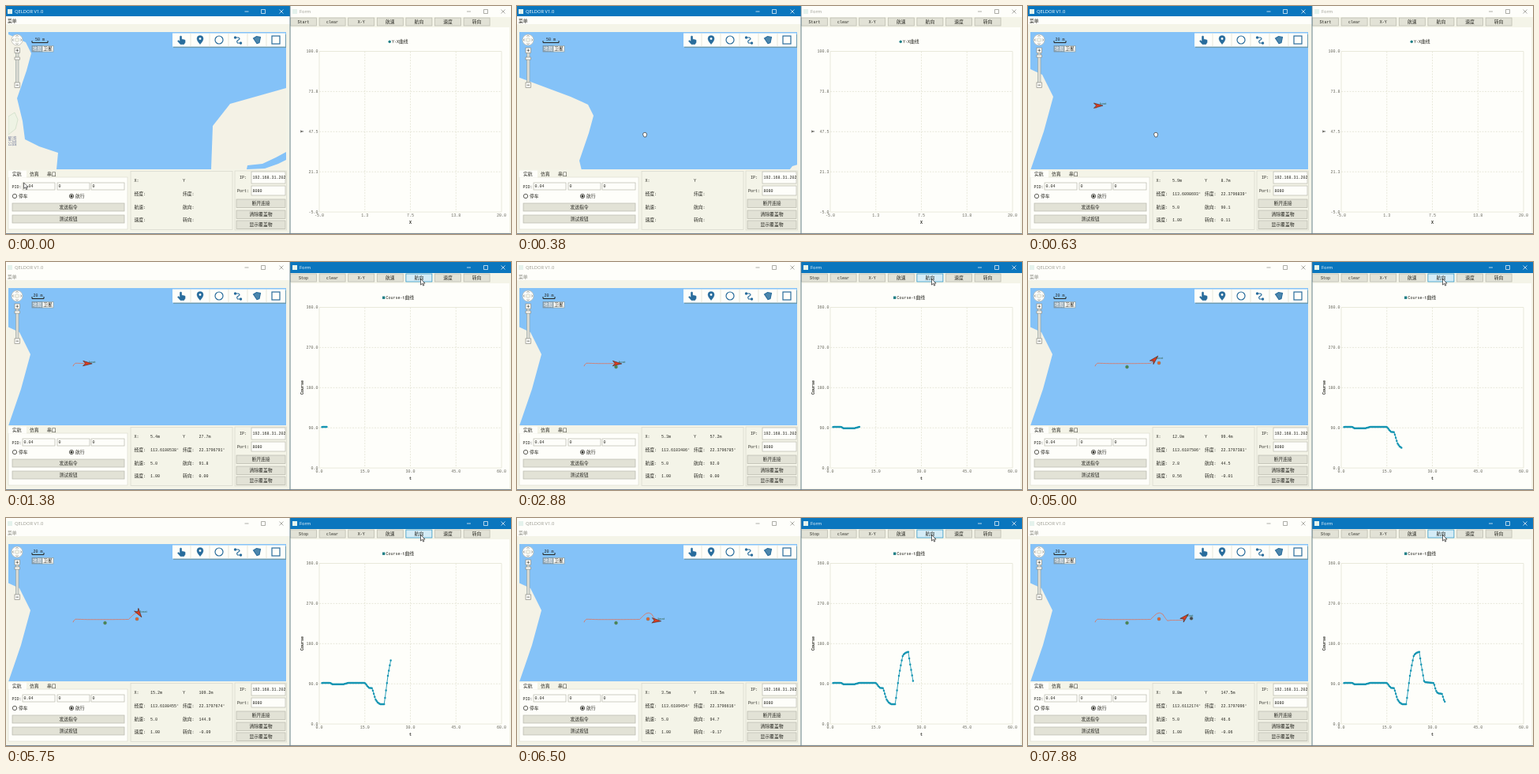
An HTML page for the animation above (8000 ms loop, 640 by 289 pixels).

```html
<!DOCTYPE html>
<html lang="zh">
<head>
<meta charset="utf-8">
<title>Boat control</title>
<style>
html, body { margin: 0; width: 100%; height: 100%; overflow: hidden; }
svg { display: block; width: 100vw; height: 100vh; }
text { font-family: "Liberation Mono", "Noto Sans CJK SC", "Noto Sans CJK", monospace; white-space: pre; }
text.ui { font-family: "Open Sans", sans-serif; }
</style>
</head>
<body>
<svg id="stage" viewBox="0 0 640 289"></svg>
<script>
const stage = document.getElementById('stage');
const PANEL = '#f4f4e8', PAPER = '#fefefa', BUTTON = '#e2e2d6', EDGE = '#b8b8ac';
const INK = '#25251f', BLUE = '#0a76be', WATER = '#84c2f8', LAND = '#f4f2e6', ICON = '#286c9c';
const GRID = '#e4e4d4', DATA = '#1595b2';

function add(parent, tag, attrs = {}) {
  const node = document.createElementNS('http://www.w3.org/2000/svg', tag);
  set(node, attrs);
  parent.append(node);
  return node;
}
function set(node, attrs) {
  for (const key in attrs) node.setAttribute(key, attrs[key]);
}
const show = (node, on) => set(node, { display: on ? 'inline' : 'none' });
const rect = (p, x, y, width, height, fill, stroke = 'none', w = 0.7) =>
  add(p, 'rect', { x, y, width, height, fill, stroke, 'stroke-width': w });
const line = (p, d, stroke, w = 1, fill = 'none') =>
  add(p, 'path', { d, stroke, fill, 'stroke-width': w });
const dot = (p, cx, cy, r, fill, stroke = 'none', w = 0.7) =>
  add(p, 'circle', { cx, cy, r, fill, stroke, 'stroke-width': w });

// Chinese runs are set slightly larger than the Latin ones.
function fillText(node, content) {
  if (node.dataset.value === content) return;
  node.dataset.value = content;
  node.textContent = '';
  for (const run of content.match(/[\u4e00-\u9fff]+|[^\u4e00-\u9fff]+/g) || []) {
    const span = add(node, 'tspan', { 'font-size': /[\u4e00-\u9fff]/.test(run) ? 5.8 : 5 });
    span.textContent = run;
  }
}
function text(p, x, y, content = '', anchor = 'start', fill = INK) {
  const node = add(p, 'text', { x, y, fill, 'text-anchor': anchor });
  fillText(node, content);
  return node;
}
function uiText(p, x, y, content, size, fill) {
  const node = add(p, 'text', { x, y, fill, 'font-size': size, class: 'ui' });
  node.textContent = content;
  return node;
}
function button(p, x, y, w, h, label) {
  const box = rect(p, x, y, w, h, BUTTON, EDGE);
  return { box, label: text(p, x + w / 2, y + h / 2 + 2, label, 'middle') };
}
function field(p, x, y, w, h, value) {
  rect(p, x, y, w, h, PAPER, EDGE);
  text(p, x + 1.5, y + h / 2 + 1.8, value);
}
function titleBar(x, w, h, title, [a, b, c]) {
  const bar = rect(stage, x, 0, w, h, BLUE);
  rect(stage, x + 3, 4, 6, 6, '#e4f2ec');
  const name = uiText(stage, x + 12, 9, title, 5.8, '#fff');
  const marks = line(stage, `M${a - 2.5} 7h5M${b - 2.5} 4.5h5v5h-5zM${c - 2.5} 4.5l5 5m0-5l-5 5`, '#fff', 0.7);
  return active => {
    set(bar, { fill: active ? BLUE : PAPER });
    set(name, { fill: active ? '#fff' : '#9a9a90' });
    set(marks, { stroke: active ? '#fff' : '#8c8c84' });
  };
}

rect(stage, 0, 0, 640, 289, PANEL);

// Main window
const mainTitle = titleBar(-1, 361, 13, 'QELDOR V1.0', [305, 326, 349]);
rect(stage, 0, 13, 360, 10, PAPER);
const menu = text(stage, 2, 20.5, '菜单');

const clip = add(add(stage, 'defs'), 'clipPath', { id: 'map' });
rect(clip, 3, 33, 352, 174, '#000');
const map = add(stage, 'g', { 'clip-path': 'url(#map)' });
rect(map, 3, 33, 352, 174, WATER);

const coast = add(map, 'g', { fill: LAND });
add(coast, 'path', { d: 'M-80 5L3 36 17.5 42.5 25 46 32 60 26 82 14 117 21 146 24 169 42 178 66 186 64 207V290H-80z' });
add(coast, 'path', { d: 'M420 86L355 104 284 124 262 152 260 207V290H420z' });
add(coast, 'path', { d: 'M305 207L306 202 325 200 342 192 355 185V195L345 200 328 206z', fill: WATER });
add(coast, 'path', { d: 'M3 140L11 135 15 144 12 156 3 163z', fill: '#eef3e4', stroke: '#ccdcc4', 'stroke-width': 0.7 });
text(coast, 2, 170, '星湾', 'start', '#7c84a0');
text(coast, 2, 176, '公园', 'start', '#7c84a0');

const sailing = add(map, 'g');
const track = line(sailing, '', '#e0745c', 0.9);
const hazards = [[125.5, 133, '#3c8a58'], [166, 128, '#e8602c'], [207, 127.3, '#3c4858']]
  .map(([x, y, color]) => ({ x, node: dot(sailing, x, y, 2, color, '#7c765c', 0.5) }));
const boat = add(sailing, 'g');
const hull = line(boat, 'M6 0L-5.500 -3.200 -2.500 0 -5.500 3.200z', '#5a3028', 0.7, '#dc3c20');
uiText(boat, 2, -0.8, 'boat', 4, '#2e5a3c');

// Map controls
dot(stage, 14, 43, 7, PAPER, '#b4b4ac');
dot(stage, 14, 43, 2.6, PANEL, '#c6c6bc', 0.6);
line(stage, 'M12.5 38.8l1.5-1.5 1.5 1.5M12.5 47.2l1.5 1.5 1.5-1.5M9.8 41.5l-1.5 1.5 1.5 1.5M18.2 41.5l1.5 1.5-1.5 1.5', '#7c7c74', 0.8);
rect(stage, 12.5, 57, 3.5, 42, '#dcdcd4', '#8c9c9c', 0.6);
rect(stage, 11, 53, 6.5, 6.5, PAPER, '#8c8c84');
rect(stage, 11, 97, 6.5, 6.5, PAPER, '#8c8c84');
line(stage, 'M12.5 56.2h3.5M14.25 54.5v3.5M12.5 100.2h3.5', '#55554e', 0.8);
const knob = rect(stage, 11, 64, 6.5, 3, PAPER, '#8c8c84');
const scaleText = text(stage, 43, 43.5, '', 'middle');
const scaleBar = line(stage, '', INK, 1);
rect(stage, 33, 50.5, 13, 7.5, '#8ea5b4', '#788c98');
rect(stage, 46, 50.5, 14, 7.5, PAPER, '#8c9c9c');
text(stage, 39.5, 56.2, '地图', 'middle', '#fff');
text(stage, 53, 56.2, '卫星', 'middle');

// Drawing tools
rect(stage, 212, 36, 143, 17, '#6c9cb4');
rect(stage, 211, 34.5, 143, 17, PAPER);
for (let i = 1; i < 6; i++) line(stage, `M${210 + 24 * i} 34.5v17`, '#dedecf', 0.7);
line(stage, 'M220.5 45V38.5q1.2-1 2 0v3.5l4.5 1.2v3l-1.5 2.3h-4.5l-3.5-4 1-1z', ICON, 0.6, ICON);
line(stage, 'M246 48.5q-4-4.5-4-7a4 4 0 0 1 8 0q0 2.5-4 7z', ICON, 0.5, ICON);
dot(stage, 246, 41.5, 1.4, PAPER);
dot(stage, 270, 43, 5, 'none', ICON, 1.2);
line(stage, 'M290.5 40h4q3 1.5 0 3t-1 4h4', ICON, 1.2);
dot(stage, 290.5, 40, 1.7, ICON);
dot(stage, 297.5, 47, 1.7, ICON);
line(stage, 'M313.5 41l4-2.5 5 1-1.5 7-3 1z', ICON, 1.1, '#4c86ac');
rect(stage, 337, 38, 10, 10, 'none', ICON, 1.2);

// Control tabs
rect(stage, 3, 217, 151, 66, PAPER, '#dcdcd0');
rect(stage, 3, 208.5, 23, 9, PAPER);
[['实航', 8], ['仿真', 30], ['串口', 52]].forEach(([label, x]) => text(stage, x, 215, label));
text(stage, 7.5, 231, 'PID:');
field(stage, 21, 224, 41, 9, '0.04');
field(stage, 65, 224, 41, 9, '0');
field(stage, 108, 224, 42, 9, '0');
for (const x of [11, 83]) dot(stage, x, 241, 2.7, PAPER, INK, 0.7);
dot(stage, 83, 241, 1.5, INK);
text(stage, 16, 243, '停车');
text(stage, 88, 243, '航行');
button(stage, 8, 250, 142, 10, '发送指令');
button(stage, 8, 265, 142, 10, '测试按钮');

// Readouts
rect(stage, 158, 209.5, 129, 74, 'none', '#d8d8cc');
const rows = [223, 240, 256.5, 273];
const labels = ['X:', 'Y', '经度:', '纬度:', '航速:', '航向:', '速度:', '转向:'];
const readouts = labels.map((label, i) => {
  const x = i % 2 ? 224 : 162.5, y = rows[i >> 1];
  text(stage, x, y, label);
  return text(stage, x + 20.5, y);
});

// Connection
rect(stage, 290, 209, 65.5, 75, 'none', '#d8d8cc');
text(stage, 296, 219, 'IP:');
text(stage, 293, 236, 'Port:');
field(stage, 311, 210, 43, 15, '192.168.31.202');
field(stage, 311, 228, 43, 12, '8080');
button(stage, 292, 245, 62, 10.5, '断开连接');
button(stage, 292, 259, 62, 10.5, '清除覆盖物');
button(stage, 292, 272, 62, 10.5, '显示覆盖物');

// Chart window
const formTitle = titleBar(360, 280, 14, 'Form', [586.5, 608, 630]);
const tools = ['Start', 'clear', 'X-Y', '航速', '航向', '速度', '转向']
  .map((label, i) => button(stage, 360.5 + 36.6 * i, 15, 33, 10, label));
rect(stage, 361, 27, 277, 260, PAPER);
const legendMark = rect(stage, 0, 43.5, 3.4, 3.4, '#207f86');
const legend = text(stage, 0, 47);
const xTicks = [], yTicks = [];
for (let i = 0; i < 5; i++) {
  const x = 397 + 57.75 * i, y = 57.5 + 50.9 * i;
  const grid = line(stage, `M${x} 57.5V261M397 ${y}H628`, GRID, 0.8);
  set(grid, { 'stroke-dasharray': i % 4 ? '2 1.5' : 'none' });
  xTicks.push(text(stage, x, 267, '', 'middle', '#66665c'));
  yTicks.push(text(stage, 395.5, y + 1.8, '', 'end', '#66665c'));
}
const xName = text(stage, 512.5, 275.5, '', 'middle');
const yName = text(stage, 0, 0, '', 'middle');
set(xName, { 'font-weight': 'bold' });
set(yName, { 'font-weight': 'bold', transform: 'translate(377 159) rotate(-90)' });
const curve = line(stage, '', DATA, 0.9);
const samples = line(stage, '', DATA, 2.5);
set(samples, { 'stroke-linecap': 'round' });

line(stage, 'M360 0V289', '#5c7c8c', 0.9);
line(stage, 'M0 288.5H640', '#6c7c8c', 0.9);

const arrow = line(stage, 'M0 0V7.5L1.9 5.8 3.2 8.6 4.4 8 3.2 5.4H5.6z', '#222', 0.7, '#fff');
const hand = line(stage, 'M-2 -2q2-1.5 4 0l.5 2-1 3h-2.5l-1.5-3z', '#333', 0.7, '#fff');

// Motion
function along(points, at, column = 1) {
  if (at <= points[0][0]) return points[0][column];
  for (let i = 1; i < points.length; i++) {
    const a = points[i - 1], b = points[i];
    if (at <= b[0]) return a[column] + (b[column] - a[column]) * (at - a[0]) / (b[0] - a[0]);
  }
  return points[points.length - 1][column];
}
const ZOOM_STEP = 4, FOCUS_STEP = 7, START_STEP = 8, COURSE_STEP = 10;
// step, chart seconds, metres east
const progress = [[4, -1.5, 5.5], [5, -0.8, 8.7], [11, 2.6, 27.7], [23, 9.6, 57.23], [33, 15.7, 83],
  [40, 20, 99.44], [45, 23, 107.5], [52, 27.3, 119.5], [63, 34.3, 147.5]];
const north = [[5, 1], [6, 3.5], [8.7, 5.94], [27.7, 5.4], [57.2, 5.34], [93, 5.6], [99.44, 11.98], [103, 14.8],
  [107.5, 16], [112, 14], [116, 8], [119.5, 3.46], [124, 4.2], [142.5, 4.4], [147.5, 8.8]];
const course = [[-0.8, 90.1], [1, 91.8], [3.6, 91.8], [4.3, 89], [8, 89], [9.6, 92], [15, 92], [15.8, 85], [16.4, 81],
  [17.4, 80], [17.9, 69], [18.5, 55], [19.2, 48], [20, 44.5], [21.4, 44.3], [22.6, 108], [23.4, 138],
  [23.9, 154], [24.7, 159], [25.7, 161.5], [26.2, 138], [27.3, 94.7], [27.8, 93.5], [30.5, 91.5],
  [31.1, 76], [31.7, 69], [33.2, 67], [33.7, 55], [34.3, 46.6]];
const speed = [[32, 5], [36, 2.8], [41, 2.8], [44, 5]];
const turn = [[5, 0.11], [9, 0], [39, 0], [40, -0.01], [52, -0.17], [54, 0], [60, 0], [63, -0.06]];
const pointer = [[0, 22.5, 224], [1, 97, 84], [3, 162, 163], [5, 162, 163], [6, 161, 165],
  [FOCUS_STEP, 376, 19], [START_STEP, 376, 19], [COURSE_STEP, 525.5, 21.5]];
const charts = [
  { title: 'Y-X曲线', x: 'X', y: 'Y', left: 484.5, xs: [-5, 20], ys: [100, -5] },
  { title: 'Course-t曲线', x: 't', y: 'Course', left: 477, xs: [0, 60], ys: [360, 0] }
];
const toMap = east => [81 + 0.8 * east, 133 - 0.8 * along(north, east)];

function drawChart(kind, step) {
  const { title, x, y, left, xs, ys } = charts[kind];
  set(legendMark, { x: left, rx: kind ? 0 : 1.7 });
  set(legend, { x: left + 4.5 });
  fillText(legend, title);
  fillText(xName, x);
  fillText(yName, y);
  const tick = ([a, b], i) => (Math.round((a + (b - a) * i / 4) * 10 + 1e-6) / 10).toFixed(1);
  xTicks.forEach((node, i) => fillText(node, tick(xs, i)));
  yTicks.forEach((node, i) => fillText(node, tick(ys, i)));

  const now = along(progress, step), points = [];
  if (step >= START_STEP) for (let t = 0.9; t <= now + 0.01; t += 0.31) {
    const east = 18.5 + (t - 0.9) * 5.4;
    const [u, v] = kind ? [t, along(course, t)] : [along(north, east), east];
    points.push((397 + 231 * (u - xs[0]) / (xs[1] - xs[0])).toFixed(1) + ' ' +
      (57.5 + 203.5 * (ys[0] - v) / (ys[0] - ys[1])).toFixed(1));
  }
  set(curve, { d: points.length ? 'M' + points.join('L') : '' });
  set(samples, { d: points.map(p => `M${p}h0.01`).join('') });
}

// The map is dragged by hand, then zoomed twofold under the pointer.
function drawMap(step, east, heading) {
  const near = step >= ZOOM_STEP;
  const drag = Math.min(1, Math.max(0, (step - 1) / 2));
  const nudge = step < 6 ? [1, -2] : [0, 0];
  set(coast, { transform: near
    ? `translate(${nudge[0] - 33} ${nudge[1] - 3}) scale(2)`
    : `translate(${65 * drag} ${79 * drag})` });
  show(sailing, near);
  set(sailing, { transform: `translate(${nudge})` });
  set(knob, { y: near ? 62 : 65 });
  fillText(scaleText, near ? '20 m' : '50 m');
  set(scaleText, { x: near ? 40.5 : 43 });
  set(scaleBar, { d: `M33 44v2.5h${near ? 15 : 20}v-2.5` });

  const trail = [], place = toMap(east);
  for (let e = 5; e < east; e++) trail.push(toMap(e));
  trail.push(place);
  set(track, { d: 'M' + trail.map(p => p.map(n => n.toFixed(1)).join(' ')).join('L') });
  set(boat, { transform: `translate(${place})` });
  set(hull, { transform: `rotate(${heading - 90})` });
  hazards.forEach(({ x, node }) => show(node, place[0] > x - 19));
}

function draw(step) {
  const formActive = step >= FOCUS_STEP, courseView = step >= COURSE_STEP;
  mainTitle(!formActive);
  formTitle(formActive);
  set(menu, { fill: formActive ? '#8a8a80' : INK });
  fillText(tools[0].label, step >= START_STEP ? 'Stop' : 'Start');
  set(tools[4].box, { fill: courseView ? '#d4ecf6' : BUTTON, stroke: courseView ? '#2090c4' : EDGE });

  const seconds = along(progress, step), east = along(progress, step, 2);
  const x = along(north, east), heading = along(course, seconds), v = along(speed, step);
  drawMap(step, east, heading);

  const values = [x.toFixed(1) + 'm', east.toFixed(1) + 'm',
    (113.6098693 + 9.7125e-6 * (east - 8.7)).toFixed(7) + '°',
    (22.3796839 + 8.98e-6 * (x - 5.94)).toFixed(7) + '°',
    v.toFixed(1), heading.toFixed(1), (v / 5).toFixed(2), along(turn, step).toFixed(2).replace('-0.00', '0.00')];
  readouts.forEach((node, i) => fillText(node, step >= ZOOM_STEP ? values[i] : ''));

  drawChart(courseView ? 1 : 0, step);

  const dragging = step >= 1 && step < FOCUS_STEP;
  const place = { transform: `translate(${along(pointer, step)} ${along(pointer, step, 2)})` };
  set(arrow, place);
  set(hand, place);
  show(arrow, !dragging);
  show(hand, dragging);
}

let shown = -1;
function frame() {
  const step = Math.floor(performance.now() % 8000 / 125);
  if (step !== shown) draw(shown = step);
  requestAnimationFrame(frame);
}
frame();
</script>
</body>
</html>
```
